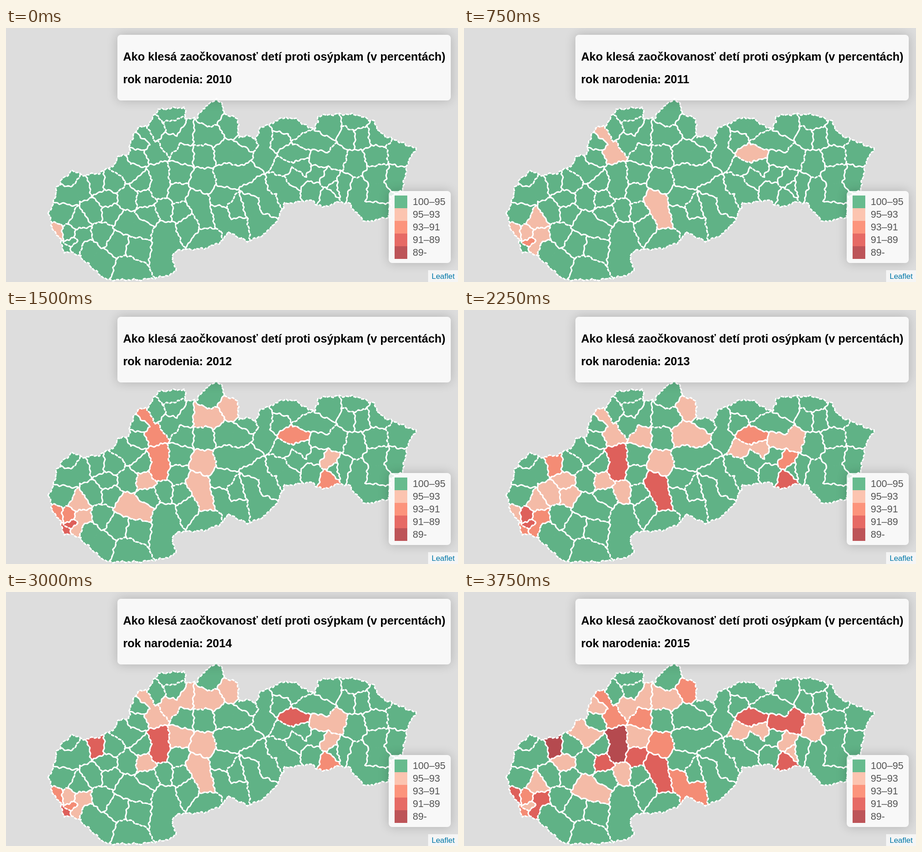
These frames come from a looping animation (998 by 561 pixels, 4.5 s). An HTML page:

```html
<!DOCTYPE html>
<html lang="sk">
<head>
<meta charset="utf-8">
<style>
html, body { margin: 0; width: 100%; height: 100%; overflow: hidden; background: #ddd; }
body { position: relative; font-family: "Liberation Sans", Arial, sans-serif; }
svg { position: absolute; left: 0; top: 0; }
.panel { position: absolute; background: rgba(255,255,255,.8); border-radius: 8px; box-shadow: 0 0 23px rgba(0,0,0,.2); }
.cells path { fill: currentColor; stroke: currentColor; }
.border { fill: none; stroke: #fff; stroke-width: 3.1; stroke-linecap: round; stroke-linejoin: round; stroke-dasharray: 4.65; }
.title { font-weight: bold; font-size: 25.45px; }
.legend { font-size: 21.7px; fill: #555; }
.credit { font-size: 17px; fill: #0078a8; }
</style>
</head>
<body>
<svg width="998" height="561">
  <clipPath id="country"></clipPath>
  <g clip-path="url(#country)">
    <g id="cells" class="cells"></g>
    <g id="borders"></g>
  </g>
  <g id="coast"></g>
</svg>
<div class="panel" style="left:246px;top:15px;width:736px;height:145px"></div>
<div class="panel" style="left:845px;top:360px;width:137px;height:159px"></div>
<svg width="998" height="561">
  <g class="title">
    <text x="258.4" y="71.5">Ako klesá zaočkovanosť detí proti osýpkam (v percentách)</text>
    <text id="year" x="258.4" y="122"></text>
  </g>
  <g class="legend" id="legend"></g>
  <rect x="932" y="535" width="66" height="26" fill="#fff" fill-opacity=".7"/>
  <text class="credit" x="939.7" y="553.5">Leaflet</text>
</svg>
<script>
const STEP = 750, FIRST_YEAR = 2010, YEARS = 6;
const mapColors = ['#60b286', '#f4bba7', '#f48c75', '#de605b', '#b54a4f'];
const legendColors = ['#67bb8e', '#fcc4b0', '#fc947c', '#e66a65', '#bd5458'];
const legendLabels = ['100–95', '95–93', '93–91', '91–89', '89-'];

const outline = `95,410 106,385 113,352 124,336 147,314 169,325 205,321 240,303 246,283 271,281 276,250 291,221
  314,214 336,180 394,175 396,199 420,200 435,178 462,158 474,163 484,190 511,199 514,242 535,237 551,246 562,218
  588,211 603,199 638,199 668,220 683,221 690,195 726,190 772,191 812,207 830,235 882,257 906,266 888,296 875,356
  850,374 845,418 795,429 778,415 760,388 735,384 700,396 672,380 616,388 597,430 560,462 532,471 490,450
  472,475 440,487 376,490 366,512 378,537 350,549 300,556 222,556 185,525 152,497 127,495 122,470 104,445`;

// Districts grow from one or two centres; "levels" holds one coverage class per year.
const changing = `112123 113,457|011101 162,428|011213 167,457 153,486|012312 137,457|023321 143,475|003232 133,487
  |012112 308,236 328,275|012233 624,279 650,276|011313 418,381 440,420|001112 491,216|001011 430,236 458,237
  |002334 338,322 335,355|001112 434,338|001113 309,376|001001 265,430 298,442|001211 712,336|002323 710,368
  |000001 723,353|000234 198,342|000100 193,406|000101 223,378|000100 231,408|000101 350,400|000003 381,367
  |000102 392,280|000100 482,272 520,278|000101 612,306 655,306|000113 690,288 728,285|000011 361,253 398,234
  |000011 382,319|000001 297,250|000001 258,305 282,317|000001 772,298|000002 474,413 510,442`;
const steady = `140,332|135,366 168,350|128,412|235,342|301,340|268,375|316,412|212,455|245,475|180,490 210,515
  |270,532|290,485|350,455 350,495|385,403|404,438|440,465|480,376|508,398|560,435 540,390|552,352 578,385
  |600,345 620,370|490,327 535,322|570,285 570,245|537,250|603,250|642,222 612,212|660,252 698,255|715,222
  |770,208|783,240|757,240|820,235|815,285|870,278|860,330|820,322 820,365|775,360 815,405|742,350|680,360
  |640,328 685,322|436,280|452,195|365,190|372,217|328,225|290,287`;

const byId = id => document.getElementById(id);
const toPoints = text => text.trim().split(/\s+/).map(pair => pair.split(',').map(Number));

function add(parent, tag, attrs = {}, text = '') {
  const node = document.createElementNS('http://www.w3.org/2000/svg', tag);
  for (const key in attrs) node.setAttribute(key, attrs[key]);
  node.textContent = text;
  return parent.appendChild(node);
}

// A smooth warp makes straight edges wiggle and keeps shared edges together.
const warp = (x, y) => [
  x + 1.3 * Math.sin(.5 * y + .2 * x) + 1.3 * Math.sin(.22 * y - .1 * x),
  y + 1.3 * Math.sin(.5 * x - .2 * y) + 1.3 * Math.sin(.22 * x + .1 * y)
].map(v => v.toFixed(1));

function ragged(points, closed) {
  const path = closed ? [...points, points[0]] : points;
  const out = [warp(...path[0])];
  for (let i = 1; i < path.length; i++) {
    const [ax, ay] = path[i - 1], [bx, by] = path[i];
    const parts = Math.ceil(Math.hypot(bx - ax, by - ay) / 3) || 1;
    for (let k = 1; k <= parts; k++)
      out.push(warp(ax + (bx - ax) * k / parts, ay + (by - ay) * k / parts));
  }
  return 'M' + out.join('L') + (closed ? 'Z' : '');
}

// Voronoi cell by half-plane clipping; each corner remembers who lies across its outgoing edge.
function voronoiCell(site, sites) {
  let cell = [[0, 100], [998, 100], [998, 600], [0, 600]].map(point => ({ point }));
  for (const other of sites) {
    if (other === site) continue;
    const side = ({ point: [x, y] }) =>
      (x - other.x) ** 2 + (y - other.y) ** 2 - (x - site.x) ** 2 - (y - site.y) ** 2;
    cell = cell.flatMap((a, i) => {
      const b = cell[(i + 1) % cell.length], sa = side(a), sb = side(b);
      const kept = sa >= 0 ? [a] : [];
      if ((sa >= 0) !== (sb >= 0)) {
        const t = sa / (sa - sb);
        const point = a.point.map((v, axis) => v + (b.point[axis] - v) * t);
        kept.push({ point, across: sa >= 0 ? other : a.across });
      }
      return kept;
    });
  }
  return cell;
}

const districts = [
  ...changing.split('|').map(row => {
    const [, levels, centres] = row.match(/(\d{6}) (.*)/);
    return { levels, centres };
  }),
  ...steady.split('|').map(centres => ({ levels: '000000', centres }))
];
const sites = districts.flatMap(district =>
  toPoints(district.centres).map(([x, y]) => ({ x, y, district })));

for (const district of districts) district.node = add(byId('cells'), 'g');
for (const site of sites) {
  const cell = voronoiCell(site, sites);
  add(site.district.node, 'path', { d: ragged(cell.map(c => c.point), true) });
  cell.forEach(({ point, across }, i) => {
    if (!across || across.district === site.district) return;
    const end = cell[(i + 1) % cell.length].point;
    add(byId('borders'), 'path', { d: ragged([point, end]), class: 'border' });
  });
}

const coast = ragged(toPoints(outline), true);
add(byId('country'), 'path', { d: coast });
add(byId('coast'), 'path', { d: coast, class: 'border' });

legendLabels.forEach((label, i) => {
  const y = 370 + 28 * i;
  add(byId('legend'), 'rect', { x: 858, y, width: 28, height: 28, fill: legendColors[i] });
  add(byId('legend'), 'text', { x: 898, y: y + 21.3 }, label);
});

function draw() {
  const index = Math.floor(performance.now() / STEP) % YEARS;
  byId('year').textContent = 'rok narodenia: ' + (FIRST_YEAR + index);
  for (const { levels, node } of districts) node.setAttribute('color', mapColors[levels[index]]);
  requestAnimationFrame(draw);
}
draw();
</script>
</body>
</html>
```
